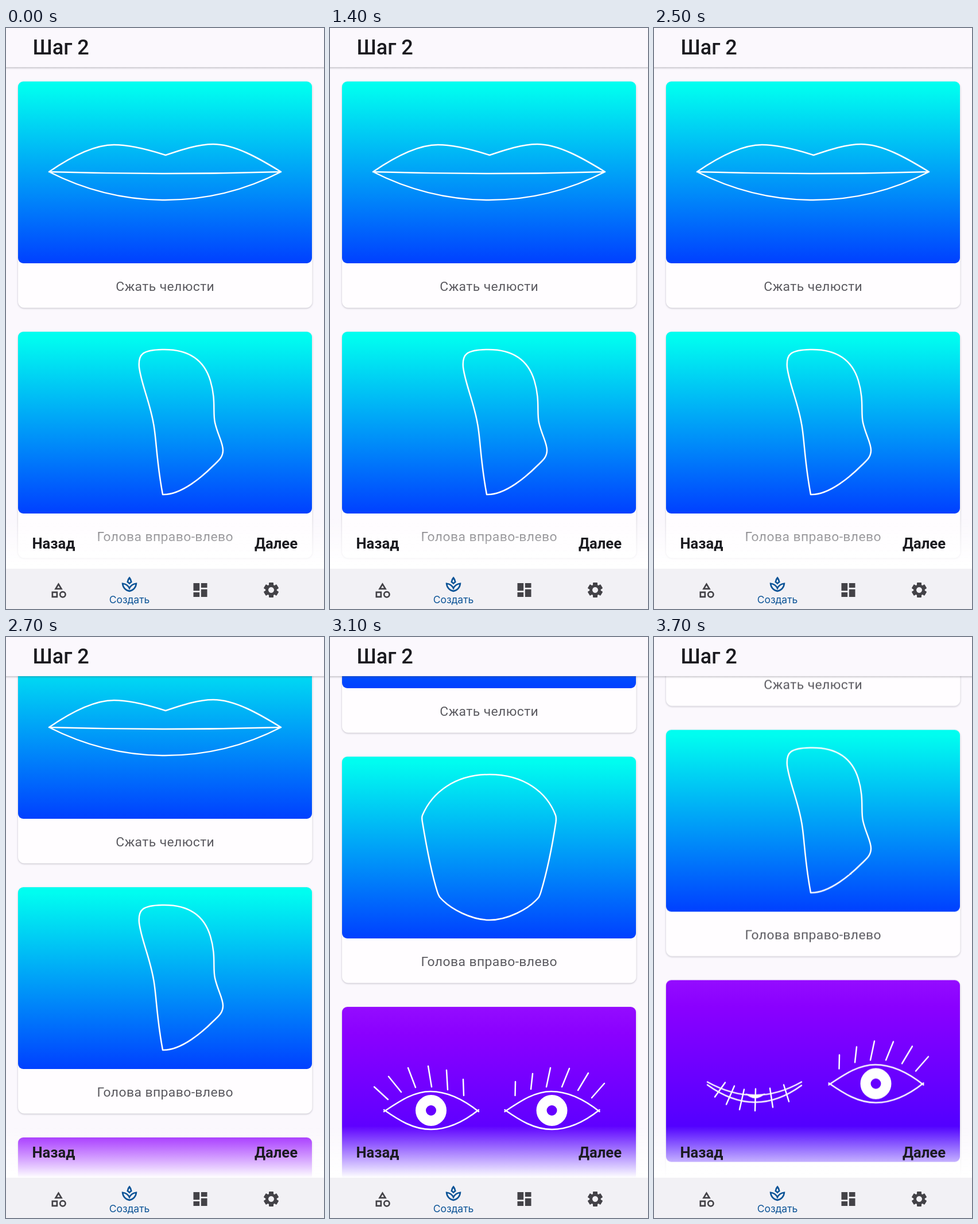
These frames come from a looping animation (554 by 1010 pixels, 3800 ms). An HTML page:

```html
<!DOCTYPE html>
<html lang="ru">
<head>
<meta charset="utf-8">
<title>Шаг 2</title>
<style>
html, body { margin: 0; width: 100%; height: 100%; overflow: hidden; background: #fbf8fd; }
svg { display: block; width: 554px; height: 1010px; font-family: Roboto, sans-serif; }

.card { fill: #fffdff; filter: drop-shadow(0 1.5px 1.5px rgba(40, 40, 60, .28)); }
.line { fill: none; stroke: #fff; stroke-width: 2.5; stroke-linecap: round; stroke-linejoin: round; }
.caption { font-size: 22.9px; letter-spacing: .41px; fill: #5b5a60; text-anchor: middle; }
.button { font-size: 25.6px; font-weight: 700; fill: #1b1b20; }
.icon { fill: none; stroke-width: 2; }

.list, .pose-a, .pose-b, .open, .wink { animation: 3.8s step-end infinite; }
.list { animation-name: scroll; }
.pose-a { animation-name: pose-a; }
.pose-b { animation-name: pose-b; }
.open { animation-name: open; }
.wink { animation-name: wink; }

@keyframes scroll {
  0% { transform: translateY(0); }
  68.2% { transform: translateY(-35px); }
  70.85% { transform: translateY(-93px); }
  73.5% { transform: translateY(-136px); }
  76.1% { transform: translateY(-158.5px); }
  78.75% { transform: translateY(-245px); }
  81.4% { transform: translateY(-320px); }
  84% { transform: translateY(-346px); }
  86.65% { transform: translateY(-358px); }
  89.3% { transform: translateY(-364px); }
  91.9%, 100% { transform: translateY(-366.5px); }
}
@keyframes pose-a {
  0%, 34%, 65.6%, 97.15%, 100% { visibility: visible; }
  18.2%, 49.8%, 81.4% { visibility: hidden; }
}
@keyframes pose-b {
  0%, 34%, 65.6%, 97.15%, 100% { visibility: hidden; }
  18.2%, 49.8%, 81.4% { visibility: visible; }
}
@keyframes open {
  0% { visibility: visible; }
  97.15%, 100% { visibility: hidden; }
}
@keyframes wink {
  0% { visibility: hidden; }
  97.15%, 100% { visibility: visible; }
}
</style>
</head>
<body>
<svg viewBox="0 0 554 1010">
  <defs>
    <linearGradient id="blue" x2="0" y2="1">
      <stop offset=".03" stop-color="#00fdf0"/>
      <stop offset="1" stop-color="#0040ff"/>
    </linearGradient>
    <linearGradient id="violet" x2="0" y2="1">
      <stop offset="0" stop-color="#940cff"/>
      <stop offset=".15" stop-color="#8a00ff"/>
      <stop offset="1" stop-color="#4200ff"/>
    </linearGradient>
    <linearGradient id="fade" x2="0" y2="1">
      <stop offset="0" stop-color="#fff" stop-opacity="0"/>
      <stop offset="1" stop-color="#fff"/>
    </linearGradient>
    <linearGradient id="shade" x2="0" y2="1">
      <stop offset="0" stop-color="#55555f" stop-opacity=".3"/>
      <stop offset="1" stop-color="#55555f" stop-opacity="0"/>
    </linearGradient>
    <rect id="card" class="card" x="21" width="512.5" height="393.5" rx="11"/>
    <rect id="picture" x="21" width="512" height="316" rx="9"/>
    <g id="eye">
      <path class="line" d="M94 182C120 165 145 147 175 147C205 147 235 163 259 182M94 179C120 197 145 213 176 213C208 213 235 198 259 179"/>
      <circle cx="176" cy="180" r="18" fill="none" stroke="#fff" stroke-width="18"/>
    </g>
    <rect id="tooth" x="-4" y="-13" width="8" height="8" rx="1"/>
  </defs>

  <rect width="554" height="1010" fill="#fbf8fd"/>

  <g class="list">
    <g transform="translate(0 93)">
      <use href="#card"/>
      <use href="#picture" fill="url(#blue)"/>
      <path class="line pose-a" d="M75 157C110 133 152 110 188 110C218 110 250 119 278 128C308 118 335 109 361 109C398 109 440 133 479 157C415 190 345 206 277 206C210 206 140 190 75 157Q277 163 479 157"/>
      <path class="line pose-b" d="M75 157C110 124 152 92 188 92C218 92 250 101 278 110C308 100 335 91 361 91C398 91 440 124 479 157C415 203 345 225 277 225C210 225 140 203 75 157Q277 120 479 157Q277 205 75 157"/>
      <text class="caption" x="277.3" y="364">Сжать челюсти</text>
    </g>
    <g transform="translate(0 528)">
      <use href="#card"/>
      <use href="#picture" fill="url(#blue)"/>
      <path class="line pose-a" d="M273 283C262 225 262 185 257 160C250 120 236 92 232 62C230 40 236 31 276 31C322 31 346 52 356 85C366 118 360 140 364 158C369 180 378 193 378 206C378 219 369 225 362 232C344 250 306 284 273 283Z"/>
      <path class="line pose-b" d="M278 31C218 31 178 62 161 102Q159.500 106 161 114C167 150 176 200 187 235Q188.500 240 191 244C210 266 248 284 278 284C308 284 346 266 364 244Q366 240 367.500 235C378 200 388 150 393.500 114Q394.500 106 393 102C378 62 338 31 278 31Z"/>
      <text class="caption" x="277.3" y="364">Голова вправо-влево</text>
    </g>
    <g transform="translate(0 963)">
      <use href="#card"/>
      <use href="#picture" fill="url(#violet)"/>
      <g class="open">
        <use href="#eye"/>
        <path class="line" d="M77 139L101 161M102 121L124 148M136 106L149 140M171 103L177 139M203 110L205 144M232 126L233 154"/>
      </g>
      <g class="wink">
        <path class="line" d="M93 177Q176 223 257 177M93 182Q176 242 257 183M124 178L106 203M140 184L126 216M157 190L149 225M177 189L176 227M202 188L207 221M226 182L235 211"/>
        <path fill="#fff" d="M159 197Q176 201 194 197Q176 214 159 197Z"/>
      </g>
      <use href="#eye" x="210.500"/>
      <path class="line" d="M323 130L322.500 154M353 116L350 143M384 106L377 139M417 107L404 139M450 115L432 145M478 133L456 158"/>
    </g>
  </g>

  <rect y="850" width="554" height="90" fill="url(#fade)"/>
  <text class="button" x="45.500" y="905">Назад</text>
  <text class="button" x="508" y="905" text-anchor="end">Далее</text>

  <rect width="554" height="68" fill="#fbf8fd"/>
  <rect y="68" width="554" height="4" fill="url(#shade)"/>
  <text x="46.500" y="46" font-size="36" font-weight="500" fill="#1b1b20">Шаг 2</text>

  <rect y="940" width="554" height="70" fill="#f2f1f5"/>
  <g class="icon" stroke="#434247" transform="translate(75.500 961.500) scale(1.333)">
    <path d="M12 3.900L8.300 10H15.700ZM4 14.500h6v6h-6Z"/>
    <circle cx="17.500" cy="17.500" r="3.500"/>
  </g>
  <path class="icon" stroke="#0c5497" transform="translate(199 951) scale(1.333)" d="M12 11Q10.900 9.900 9.600 9Q10 5.700 12.050 3.500Q14 5.700 14.450 9Q13.100 9.900 12 11ZM12 20.950C6.900 20 3.400 16.200 3.100 11.100C7 11.600 10.300 13.800 12 17.200C13.700 13.800 17 11.600 20.900 11.100C20.600 16.200 17.100 20 12 20.950Z"/>
  <text x="215" y="1000" font-size="17.500" text-anchor="middle" fill="#0c5497" style="font-family: Inter, sans-serif">Создать</text>
  <path fill="#434247" transform="translate(322.500 961) scale(1.333)" d="M3 13h8V3H3zM3 21h8v-6H3zM13 21h8V11h-8zM13 3v6h8V3z"/>
  <g fill="#434247" transform="translate(462 977)">
    <circle r="7.300" fill="none" stroke="#434247" stroke-width="5"/>
    <use href="#tooth"/>
    <use href="#tooth" transform="rotate(60)"/>
    <use href="#tooth" transform="rotate(120)"/>
    <use href="#tooth" transform="rotate(180)"/>
    <use href="#tooth" transform="rotate(240)"/>
    <use href="#tooth" transform="rotate(300)"/>
    <circle r="4.800" fill="#f2f1f5"/>
  </g>
</svg>
</body>
</html>
```
